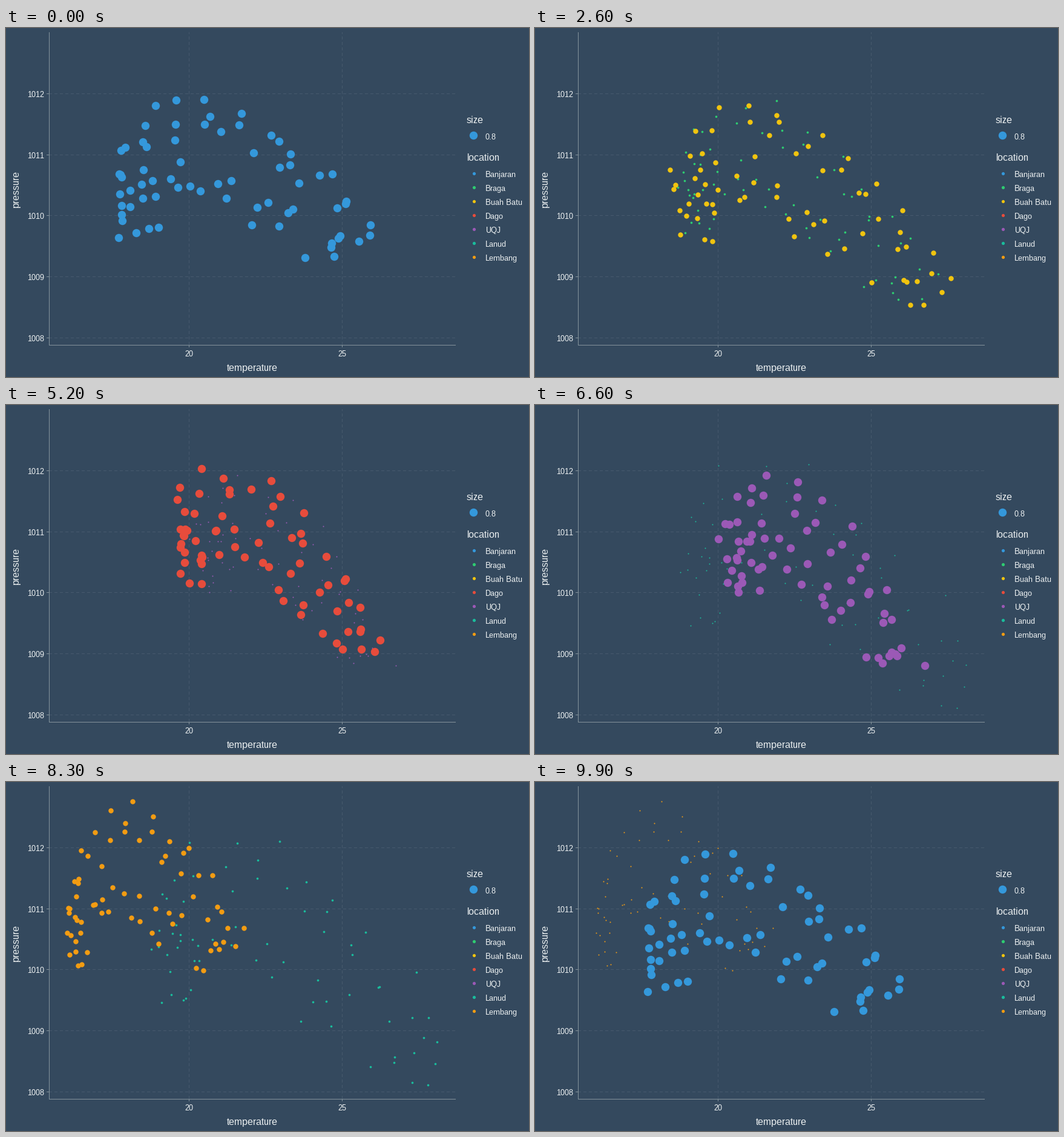
Recreate the animation shown at these times as a matplotlib script. Size 864 px wide and 576 px high, loop 10000 ms.

```python
import numpy as np
import matplotlib.pyplot as plt
from matplotlib.animation import FuncAnimation

W, H = 864, 576
FRAMES, STEP_MS, FADE = 100, 100, 6
HOURS = np.arange(68)
BG, GRID, AXIS, INK = "#34495e", "#46596d", "#84929b", "#ecf0f1"
FULL_R, BASE_R, KEY_R = 6.7, 0.5, 2.6
LEAVE = [8, 23, 38, 52, 66, 80, 94]  # frame at which each group starts to shrink

# name, colour, left, right, top, bottom of the cloud, pull of warmth on pressure
GROUPS = [
    ("Banjaran", "#3498db", 186, 602, 118, 379, 0.15),
    ("Braga", "#2ecc71", 236, 666, 120, 448, 0.48),
    ("Buah Batu", "#f1c40f", 223, 687, 128, 457, 0.43),
    ("Dago", "#e74c3c", 283, 618, 105, 407, 0.56),
    ("UQJ", "#9b59b6", 303, 644, 116, 430, 0.56),
    ("Lanud", "#1abc9c", 240, 712, 98, 500, 0.43),
    ("Lembang", "#f39c12", 101, 393, 32, 311, -0.06),
]

# one day of weather: hour, warmth and pressure drop, both from 0 to 1
CLOCK = [0, 3, 5, 7, 9, 11, 13, 15, 16.5, 18, 20, 22, 24]
WARMTH = [.16, .08, .04, .15, .38, .62, .82, .97, .90, .66, .45, .28, .16]
DROP = [.55, .62, .42, .15, .02, .20, .45, .75, .92, .65, .55, .45, .55]

plt.rcParams.update({"font.family": "Liberation Sans",
                     "text.hinting": "native", "text.hinting_factor": 1})
fig = plt.figure(figsize=(W / 72, H / 72), dpi=72, facecolor=BG)  # 1 pt = 1 px
ax = fig.add_axes([0, 0, 1, 1])
ax.set_xlim(0, W)
ax.set_ylim(H, 0)
ax.axis("off")


def line(x0, y0, x1, y1, color, z, dash="-"):
    ax.plot([x0, x1], [y0, y1], color=color, lw=1, ls=dash, zorder=z,
            antialiased=False, snap=False,
            solid_capstyle="butt", dash_capstyle="butt")


def label(x, y, text, size=13, ha="left", **kw):
    ax.text(x, y, text, color=INK, fontsize=size, ha=ha, va="baseline",
            zorder=20, **kw)


def area(r):
    return (2 * r) ** 2


def dots(x, y, color, r):
    return ax.scatter(x, y, s=area(r), c=color, linewidths=0, zorder=5)


def stretch(a, lo, hi):
    return lo + (hi - lo) * (a - a.min()) / np.ptp(a)


def cloud(seed, left, right, top, bottom, pull):
    """Hourly readings: a daily loop, each day cooler and lower in pressure."""
    rng = np.random.default_rng(seed)
    day, hour = np.divmod(HOURS, 24)
    warm = np.interp(hour, CLOCK, WARMTH) * (1 - 0.06 * day)
    drop = np.interp(hour, CLOCK, DROP) + 0.15 * day * (1 - warm)
    warm = warm + rng.normal(0, 0.025, HOURS.size)
    drop = drop + rng.normal(0, 0.03, HOURS.size) + pull * warm
    return stretch(warm, left, right), stretch(drop, top, bottom)


def draw_axes():
    dash = (0, (4, 4))
    for value in range(1008, 1013):
        y = round(108 + (1012 - value) * 100.7) + 0.5
        line(71, y, 743, y, GRID, 1, dash)
        line(67, y, 71, y, AXIS, 15)
        label(63, y + 5.5, str(value), ha="right")
    for value in (20, 25):
        x = 302.5 + (value - 20) * 50.6
        line(x, 523, x, 7, GRID, 1, dash)
        line(x, 523, x, 527, AXIS, 15)
        label(x, 542, str(value), ha="center")
    line(71.5, 7, 71.5, 524, AXIS, 15)
    line(71, 523.5, 743, 523.5, AXIS, 15)
    label(407, 566, "temperature", 16, "center")
    label(21, 265, "pressure", 16, "center", rotation=90,
          rotation_mode="anchor")


def draw_legend():
    label(761, 157, "size", 16)
    dots(772, 177, GROUPS[0][1], FULL_R)
    label(792, 184, "0.8")
    label(761, 219, "location", 16)
    for i, (name, color, *_) in enumerate(GROUPS):
        dots(772.5, 240 + 23 * i, color, KEY_R)
        label(792, 246 + 23 * i, name)


def radius(i, frame):
    """Dot radius of group i: grow in, hold, shrink out, gone."""
    enter, leave = LEAVE[i - 1], LEAVE[i]
    age = (frame - enter) % FRAMES
    life = (leave - enter) % FRAMES
    if age >= life + FADE:
        return 0
    if age < FADE:
        share = age / (FADE - 1)
    elif age < life:
        share = 1
    else:
        t = (age - life) / (FADE - 1)
        share = ((1 + np.cos(np.pi * t)) / 2) ** 1.45
    return max(1, BASE_R + (FULL_R - BASE_R) * share)


def update(frame):
    for i, art in enumerate(clouds):
        r = radius(i, frame)
        art.set_visible(r > 0)
        art.set_sizes([area(r)])
        art.set_zorder(5 + r / 10)
    return clouds


draw_axes()
draw_legend()
clouds = [dots(*cloud(seed, *box), color, FULL_R)
          for seed, (_, color, *box) in enumerate(GROUPS)]
anim = FuncAnimation(fig, update, frames=FRAMES, interval=STEP_MS,
                     init_func=lambda: update(0), repeat=True)
plt.show()
```
